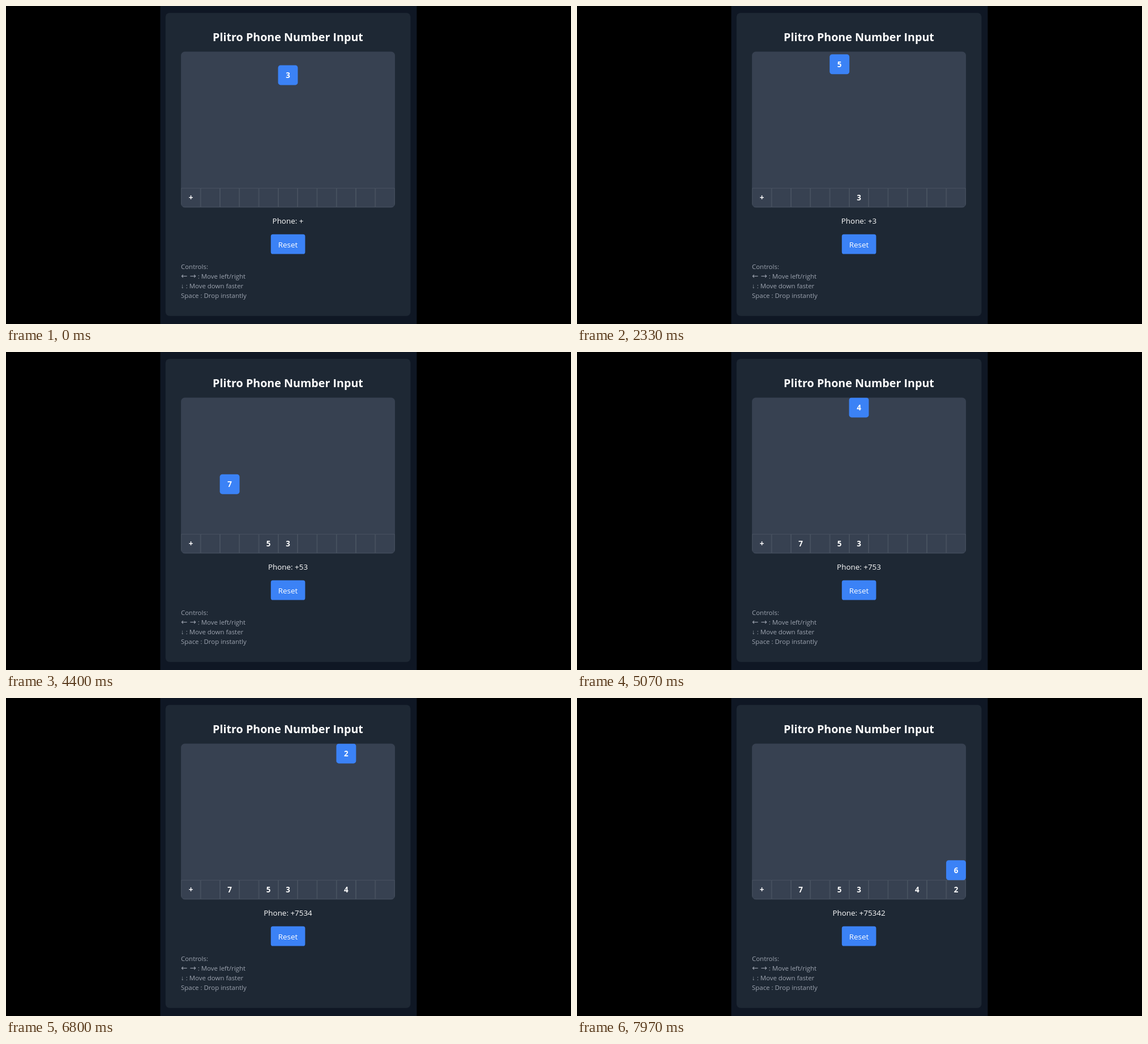
Write an HTML page that moves like this. It is 998 px wide and 561 px high and loops after 8 s.

```html
<!DOCTYPE html>
<html lang="en">
<head>
<meta charset="utf-8">
<style>
  html, body { margin: 0; width: 100%; height: 100%; overflow: hidden; background: #000; }
  svg { display: block; font-family: "Open Sans", "Noto Sans", sans-serif; font-size: 13.4px; fill: #fff; }
  .mid { text-anchor: middle; }
  .bold { font-weight: 700; }
  .title { font-weight: 700; font-size: 19.7px; }
  .hint { font-size: 11.45px; fill: #9ca3af; }
  .arrows { font: 13.4px "DejaVu Sans", sans-serif; }
</style>
</head>
<body>
<svg width="998" height="561" viewBox="0 0 998 561">
  <rect x="272.5" width="453" height="561" fill="#0f1724"/>
  <rect x="281.8" y="12.2" width="432.7" height="534.5" rx="6.9" fill="#1e2834"/>
  <text class="mid title" x="498" y="61.6">Plitro Phone Number Input</text>
  <clipPath id="clip"><rect id="board" x="309.1" y="80.6" width="378" height="274.8" rx="6.9"/></clipPath>
  <use href="#board" fill="#374151"/>
  <g clip-path="url(#clip)">
    <g id="cells" class="mid bold"></g>
    <g id="block" class="mid bold">
      <rect x="-.3" y="-.3" width="34.9" height="34.9" rx="4.5" fill="#3b82f6"/>
      <text x="17.15" y="22.1"></text>
    </g>
  </g>
  <text id="phone" class="mid" x="498" y="384.2"></text>
  <rect x="467.8" y="402.8" width="60.6" height="34.8" rx="3.6" fill="#3b82f6"/>
  <text class="mid" x="498" y="425.6">Reset</text>
  <g class="hint">
    <text x="309" y="464.2">Controls:</text>
    <text x="309" y="481.2"><tspan class="arrows">← →</tspan> : Move left/right</text>
    <text x="309" y="498.2">↓ : Move down faster</text>
    <text x="309" y="515.2">Space : Drop instantly</text>
  </g>
</svg>
<script>
const LOOP = 8000, COLS = 11, CELL = 34.3, LEFT = 309.35, TOP = 80.8;
const START_COL = 5, STEP = 40, REST_ROW = 5;
const $ = id => document.getElementById(id);

// Times in ms. A block appears, steps sideways to col, falls at pace ms per row,
// rests above the last row and takes that row just before it lands.
const blocks = [
  { digit: 3, col: 5, appear: 0, move: 0, fall: 30, pace: 350, land: 2000, top: .7 },
  { digit: 5, col: 4, appear: 2330, move: 2330, fall: 2670, pace: 65, land: 3370, top: .14 },
  { digit: 7, col: 2, appear: 3500, move: 3730, fall: 3770, pace: 160, land: 4850, top: 0 },
  { digit: 4, col: 8, appear: 5070, move: 5270, fall: 5480, pace: 160, land: 6440, top: 0 },
  { digit: 2, col: 10, appear: 6670, move: 6700, fall: 6890, pace: 35, land: 7110, top: 0 },
  { digit: 6, col: 10, appear: 7330, move: 7450, fall: 7680, pace: 45, land: 7950, top: 0 }
];

const clamp = (v, max) => Math.max(0, Math.min(max, v));

function colAt({ col, move }, t) {
  const away = col - START_COL;
  const steps = clamp(Math.floor((t - move) / STEP) + 1, Math.abs(away));
  return START_COL + Math.sign(away) * steps;
}

function rowAt({ top, fall, pace, land }, t) {
  const fallen = clamp((t - fall) / pace, REST_ROW - top);
  return top + fallen + clamp((t - land) / pace + 1, 1);
}

for (let c = 0; c < COLS; c++) {
  $('cells').innerHTML += `<g transform="translate(${LEFT + c * CELL} ${TOP + 7 * CELL})">
    <rect x=".43" y=".43" width="33.44" height="33.44" fill="none" stroke="#4b5563" stroke-width=".86"/>
    <text x="17.15" y="22.1"></text></g>`;
}
const labels = $('cells').querySelectorAll('text');

function draw(t) {
  // The first digit to reach a column keeps it.
  const filled = Array(COLS).fill('');
  filled[0] = '+';
  for (const b of blocks)
    if (t >= b.land) filled[b.col] ||= b.digit;
  labels.forEach((label, i) => label.textContent = filled[i]);
  $('phone').textContent = 'Phone: ' + filled.join('');

  const active = blocks.filter(b => b.appear <= t).pop();
  const x = LEFT + colAt(active, t) * CELL, y = TOP + rowAt(active, t) * CELL;
  $('block').setAttribute('transform', `translate(${x} ${y})`);
  $('block').lastElementChild.textContent = active.digit;
}

const start = performance.now();
function tick() {
  draw((performance.now() - start) % LOOP);
  requestAnimationFrame(tick);
}
tick();
</script>
</body>
</html>
```
